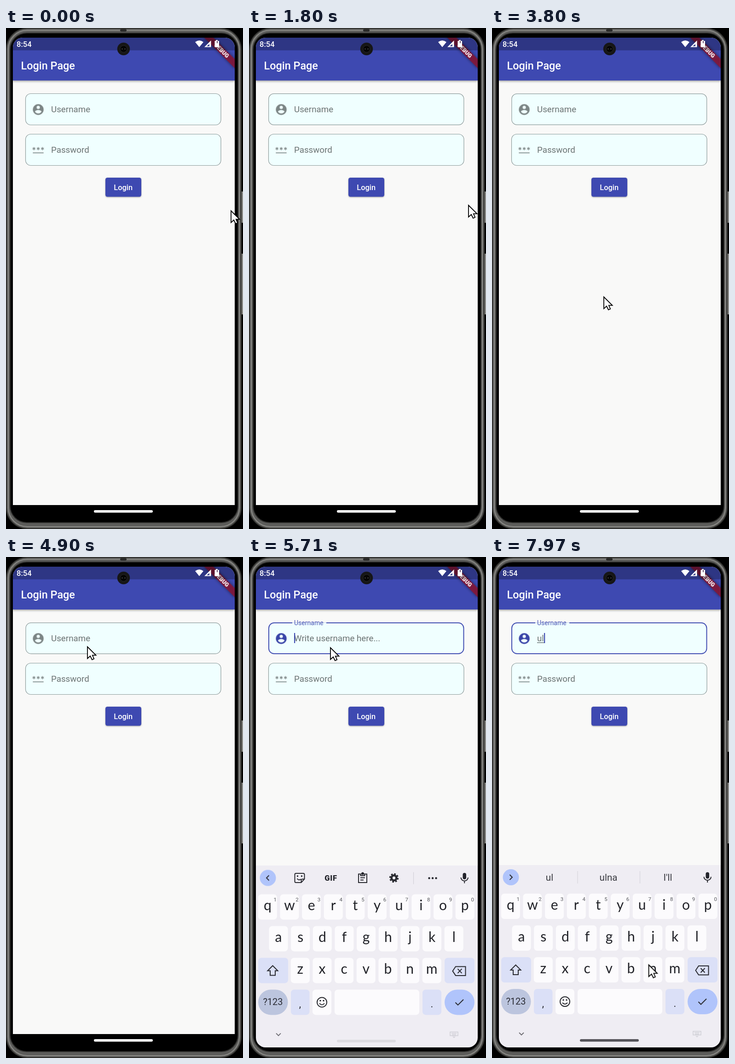
Recreate the animation shown at these times as an HTML page. Size 515 by 1088 pixels, loop 8 s.

```html
<!DOCTYPE html>
<html lang="en">
<head>
<meta charset="utf-8">
<title>Login screen</title>
<style>
html, body { margin: 0; width: 100%; height: 100%; overflow: hidden; background: #000; }
svg { display: block; width: 100%; height: 100%; font-family: Roboto, sans-serif; }
.mid { text-anchor: middle; }
.bold { font-weight: 500; }
.line { fill: none; stroke: #2a2b31; stroke-width: 2; }
.field { fill: #f0ffff; stroke: #8f9c9c; stroke-width: 1.2; }
.label { font-size: 18.75px; fill: #6c7474; }
.icon { fill: #7c8585; }
.drop { filter: drop-shadow(0 1.5px 1.5px rgba(0,0,0,.35)); }
.key { font: 30px Lato, sans-serif; fill: #202127; }
.word { font-size: 20.5px; fill: #3a3b41; }

/* Every part shares one 8 s timeline */
.loop { animation: 8s linear infinite; }
.cut { animation: 8s step-end infinite; }
#pointer { animation-name: point; animation-timing-function: ease-in-out; }
#keyboard { animation-name: slide; }
#pill { animation-name: pill; }
#user { animation-name: outline; }
#userIcon { animation-name: tint; }
#userLabel { animation-name: float; }
#notch { animation-name: notch; }
#hint { animation-name: hint; }
#caret { animation-name: blink; }
.tools { animation-name: tools; }
.typed { animation-name: typed; }
.one { animation-name: one; }
.two { animation-name: two; }
.popU { animation-name: popU; }
.popL { animation-name: popL; }

@keyframes point {
  0%, 7.5% { transform: translate(489px, 397px); }
  19%, 31% { transform: translate(477px, 385px); }
  44%, 49.5% { transform: translate(243px, 584px); }
  58.5%, 65% { transform: translate(177px, 195px); }
  69%, 73% { transform: translate(177px, 197px); }
  85%, 88.75% { transform: translate(328px, 751px); }
  92.5% { transform: translate(445px, 822px); }
  95.25% { transform: translate(445px, 822px); animation-timing-function: linear; }
  100% { transform: translate(332px, 891px); }
}
@keyframes slide {
  0% { transform: translateY(396px); }
  67.75% { transform: translateY(396px); animation-timing-function: cubic-bezier(.3,0,.1,1); }
  71.75%, 100% { transform: none; }
}
@keyframes pill { 0%, 71.4% { opacity: .12; } 73%, 100% { opacity: 1; } }
@keyframes outline {
  0%, 66.25% { stroke: #8f9c9c; stroke-width: 1.2px; }
  68.35%, 100% { stroke: #4450b3; stroke-width: 2px; x: 43px; y: 143px; width: 423.5px; height: 67px; }
}
@keyframes tint { 0%, 66.25% { fill: #7c8585; } 68.35%, 100% { fill: #3a45a8; } }
@keyframes float {
  0% { transform: translate(98px, 183px); fill: #6c7474; }
  66.25% { transform: translate(98px, 183px); fill: #6c7474; animation-timing-function: cubic-bezier(.4,0,.2,1); }
  68.35%, 100% { transform: translate(98px, 148px) scale(.75); fill: #4b57b6; }
}
@keyframes notch {
  0%, 66.25% { transform: translate(94px, 0) scaleX(0); }
  68.35%, 100% { transform: translate(94px, 0); }
}
@keyframes hint {
  0%, 66.25% { opacity: 0; }
  68.35%, 88.49% { opacity: 1; }
  88.5%, 100% { opacity: 0; }
}
@keyframes blink {
  0%, 72.5%, 85% { opacity: 0; }
  66.25%, 78.75% { opacity: 1; }
  88.5% { opacity: 1; transform: translateX(10.3px); }
  94.875%, 100% { opacity: 1; transform: translateX(15px); }
}
@keyframes tools { 0% { opacity: 1; } 88.5%, 100% { opacity: 0; } }
@keyframes typed { 0% { opacity: 0; } 88.5%, 100% { opacity: 1; } }
@keyframes one { 0%, 94.875%, 100% { opacity: 0; } 88.5% { opacity: 1; } }
@keyframes two { 0% { opacity: 0; } 94.875%, 100% { opacity: 1; } }
@keyframes popU { 0%, 88.5%, 100% { opacity: 0; } 86.75% { opacity: 1; } }
@keyframes popL { 0%, 94.875%, 100% { opacity: 0; } 92.75% { opacity: 1; } }
</style>
</head>
<body>
<svg viewBox="0 0 515 1088">
  <defs>
    <clipPath id="screen"><rect x="15" y="21" width="482" height="1044" rx="21"/></clipPath>
    <filter id="soft" x="-50%" y="-100%" width="200%" height="300%"><feGaussianBlur stdDeviation="3.5"/></filter>
    <path id="star" d="M0-3.4V3.4M-3-1.7 3 1.7M-3 1.7 3-1.7"/>
  </defs>

  <!-- Phone body -->
  <rect width="515" height="1088"/>
  <path d="M510 355h5v68h-5zM510 490h5v132h-5z" fill="#868683"/>
  <rect x="1" y="1" width="510" height="1086" rx="45" fill="#5c5c5a" stroke="#32322f" stroke-width="2"/>
  <rect x="5" y="5" width="502" height="1078" rx="41" fill="none" stroke="#8a8a86" stroke-width="2"/>
  <rect x="9" y="11" width="495" height="1063" rx="36" stroke="#2c2c2a" stroke-width="2"/>
  <rect x="248" y="2" width="14" height="6" rx="3" fill="#2a2a29"/>

  <g clip-path="url(#screen)">
    <rect x="15" y="21" width="482" height="1015" fill="#f9f9f8"/>
    <rect x="191" y="1047" width="128" height="5.5" rx="2.7" fill="#fff"/>

    <!-- App bar -->
    <rect x="15" y="21" width="482" height="93" fill="#3e49b1" style="filter:drop-shadow(0 2px 2px rgba(0,0,0,.35))"/>
    <text x="32.5" y="90" class="bold" font-size="23.4" fill="#fff">Login Page</text>

    <!-- Form -->
    <rect id="user" class="field loop" x="42.5" y="142.5" width="424.5" height="68" rx="11.5"/>
    <g id="notch" class="loop">
      <path d="M0 140h74v2.5H0z" fill="#f9f9f8"/>
      <path d="M0 142.5h74v2.5H0z" fill="#f0ffff"/>
    </g>
    <path id="userIcon" class="icon loop" fill-rule="evenodd" transform="translate(56 163) scale(1.172)" d="M12 2a10 10 0 1 0 0 20a10 10 0 1 0 0-20zm0 3a3 3 0 1 1 0 6a3 3 0 1 1 0-6zm0 14.2c-2.5 0-4.7-1.3-6-3.2 0-2 4-3.1 6-3.1s6 1.1 6 3.1c-1.3 1.9-3.5 3.2-6 3.2z"/>
    <text id="userLabel" class="label loop">Username</text>
    <text id="hint" class="label loop" x="98" y="183">Write username here...</text>
    <g class="one cut">
      <text class="label" x="98" y="183">u</text>
      <path d="M98 186h10.3" stroke="#555f5f" stroke-width="1.3"/>
    </g>
    <g class="two cut">
      <text class="label" x="98" y="183">ul</text>
      <path d="M98 186h15" stroke="#555f5f" stroke-width="1.3"/>
    </g>
    <rect id="caret" class="cut" x="98" y="165" width="2.2" height="22" fill="#3f4bb0"/>

    <rect class="field" x="42.5" y="230.5" width="424.5" height="68" rx="11.5"/>
    <g stroke="#858e8e" stroke-width="1.4">
      <use href="#star" x="60.7" y="262"/><use href="#star" x="70" y="262"/><use href="#star" x="79.3" y="262"/>
      <path d="M58.3 271.2h23.4" stroke-width="1.8"/>
    </g>
    <text class="label" x="98" y="271">Password</text>

    <rect class="drop" x="216" y="325" width="78" height="41.5" rx="4.5" fill="#3e49b1"/>
    <text x="254.7" y="352" class="mid bold" font-size="16.4" fill="#fff">Login</text>

    <!-- Corner ribbon -->
    <g transform="translate(497 21) rotate(45)">
      <rect x="-47" y="32.8" width="94" height="14" opacity=".5" filter="url(#soft)"/>
      <rect x="-47" y="32.8" width="94" height="14" fill="#84173a" fill-opacity=".9"/>
      <text y="44.2" class="mid" font-size="12" font-weight="900" fill="#fff">DEBUG</text>
    </g>

    <!-- Status bar -->
    <rect x="15" y="21" width="482" height="27.5" opacity=".25"/>
    <text x="23" y="41" class="bold" font-size="16.5" fill="#fff">8:54</text>
    <path d="M411 30.5Q420 23.5 429 30.5L420 41.5zM445.5 27V41.5H431z" fill="#fff"/>
    <path d="M442 35v4.5h-6z" fill="#2e3785"/>
    <path d="M453.5 28h2.5v-2h4v2h3v13.500h-9.5z" fill="#fff"/>
    <path d="M459 28v5" stroke="#49264f" stroke-width="1.6"/>

    <g id="keyboard" class="loop">
      <rect x="15" y="669" width="482" height="420" fill="#efedf3"/>
      <circle cx="41" cy="695.5" r="17.5" fill="#b0c4fb"/>
      <path class="line tools cut" d="M43.500 690l-5.5 5.5 5.5 5.5"/>
      <path class="line typed cut" d="M38.500 690l5.5 5.5-5.5 5.5"/>

      <g class="tools cut">
        <path class="line" d="M102 685.5h16q2.5 0 2.5 2.5v10l-7 7.5h-11.5q-2.5 0-2.5-2.5v-15q0-2.5 2.5-2.5zM120 698h-4q-2.5 0-2.5 2.5v4.5M104.500 697q4 5 8 1"/>
        <path d="M104 690h3v3h-3zM113 690h3v3h-3z" fill="#23242b"/>
        <text x="178" y="702" class="mid" font-size="16.5" font-weight="800" letter-spacing=".8" fill="#23242b">GIF</text>
        <path class="line" d="M238 687h18v18.5h-18zM242.5 687.5v3h9v-3M242 695h10M242 700h7"/>
        <circle cx="247" cy="686" r="2.8" fill="#23242b"/>
        <circle class="line" cx="315" cy="695.5" r="5.4" style="stroke-width:4.6"/>
        <circle class="line" cx="315" cy="695.5" r="8.7" style="stroke-width:3;stroke-dasharray:3.7 3.133"/>
        <path d="M357.5 683v26" stroke="#d2d1d8" stroke-width="1.2"/>
        <path d="M391.5 696h.1M399 696h.1M406.5 696h.1" stroke="#23242b" stroke-width="4.4" stroke-linecap="round"/>
      </g>
      <path class="typed cut" d="M186 682v27M321.5 682v27" stroke="#d8d7de" stroke-width="1.3"/>
      <g class="word mid one cut">
        <text x="125" y="703">u</text><text x="253" y="703">you</text><text x="382" y="703">up</text>
      </g>
      <g class="word mid two cut">
        <text x="125" y="703">ul</text><text x="253" y="703">ulna</text><text x="382" y="703">I'll</text>
      </g>
      <rect x="464.5" y="684.5" width="7.5" height="14" rx="3.75" fill="#23242b"/>
      <path class="line" d="M460.5 694.5a7.75 7.5 0 0 0 15.5 0M468.2 702v5"/>

      <g id="keys"></g>

      <path class="line" d="M51.5 886l11 11h-5.5v10h-11v-10h-5.5z"/>
      <path class="line" d="M449 888h21.5v19.500h-21.5l-6.5-9.75zM453.5 893l9 9.5M462.5 893l-9 9.5"/>
      <circle class="line" cx="158.500" cy="965.5" r="10.5"/>
      <path class="line" d="M153 968q5.5 6 11 0"/>
      <path d="M153.500 960.5h3v3h-3zM160.500 960.5h3v3h-3z" fill="#23242b"/>
      <path class="line" d="M448.500 966l5.5 5.5 12-12"/>
      <path class="line" d="M59 1033l5 5 5-5" style="stroke:#6b6a70;stroke-width:1.8"/>
      <path class="line" d="M437 1030h17v8h-17zM440 1033h11M441 1036h9M443 1040l2.5 2 2.5-2" style="stroke:#d0cfd6;stroke-width:1.5"/>
      <rect id="pill" class="loop" x="191" y="1047" width="128" height="5.5" rx="2.7" fill="#55545a"/>
      <g id="pops"></g>
    </g>
  </g>

  <!-- Camera -->
  <circle cx="255.5" cy="45.5" r="13.7" fill="#161616"/>
  <circle cx="255.5" cy="45.5" r="7.5" fill="#050505" stroke="#2b2b2b"/>
  <path d="M251.5 45.5h2M257.5 45.5h2" stroke="#555" stroke-width="2"/>

  <path id="pointer" class="loop" d="M0 0V25.5L6 20L10 28L14.2 26L10.8 18.3H18.5z" fill="#fff" stroke="#000" stroke-width="1.8"/>
</svg>
<script>
const PITCH = 47.65;
const cap = (x, y, w, fill = '#fcfbfd', r = 7) =>
  `<rect x="${x}" y="${y}" width="${w}" height="55" rx="${r}" fill="${fill}"/>`;

// A row of letter keys; digits, if given, sit in the upper right corner.
const row = (letters, x, y, digits = '') => [...letters].map((ch, i) => {
  const cx = x + i * PITCH;
  const digit = digits && `<text x="${cx + 16.5}" y="${y + 15.5}" class="mid" font-size="11.5" fill="#55565c">${digits[i]}</text>`;
  return cap(cx - 20.5, y, 41) + `<text x="${cx}" y="${y + 35}" class="key mid">${ch}</text>` + digit;
}).join('');

const pop = (name, ch, x, y, more) =>
  `<g class="${name} cut"><circle class="drop" cx="${x}" cy="${y}" r="46.5" fill="#fcfbfd"/>
   <text x="${x}" y="${y + 15}" class="key mid" style="font-size:41px">${ch}</text>
   <text x="${x}" y="${y + 39.5}" class="mid" font-size="17" fill="#202127">${more}</text></g>`;

const sign = (ch, x, y, size) =>
  `<text x="${x}" y="${y}" class="mid" font-size="${size}" fill="#2b2d36">${ch}</text>`;

const soft = '#dbe0f7';
document.getElementById('keys').innerHTML =
  row('qwertyuiop', 40.3, 731, '1234567890') +
  row('asdfghjkl', 64, 800) +
  row('zxcvbnm', 111.3, 869) +
  cap(20, 869, 65, soft) + cap(425, 869, 65, soft) +
  cap(20, 938, 64.5, '#bcc5de', 27.5) + cap(91, 938, 40.5, soft) +
  cap(138, 938, 41) + cap(186, 938, 184) + cap(377, 938, 41, soft) +
  cap(425, 938, 65, '#b0c4fb', 27.5) +
  sign('?123', 52, 972, 20) + sign(',', 111, 977, 22) + sign('.', 397.5, 977, 22);

document.getElementById('pops').innerHTML =
  pop('popU', 'u', 326, 677, '...') + pop('popL', 'l', 445, 746, '');
</script>
</body>
</html>
```
